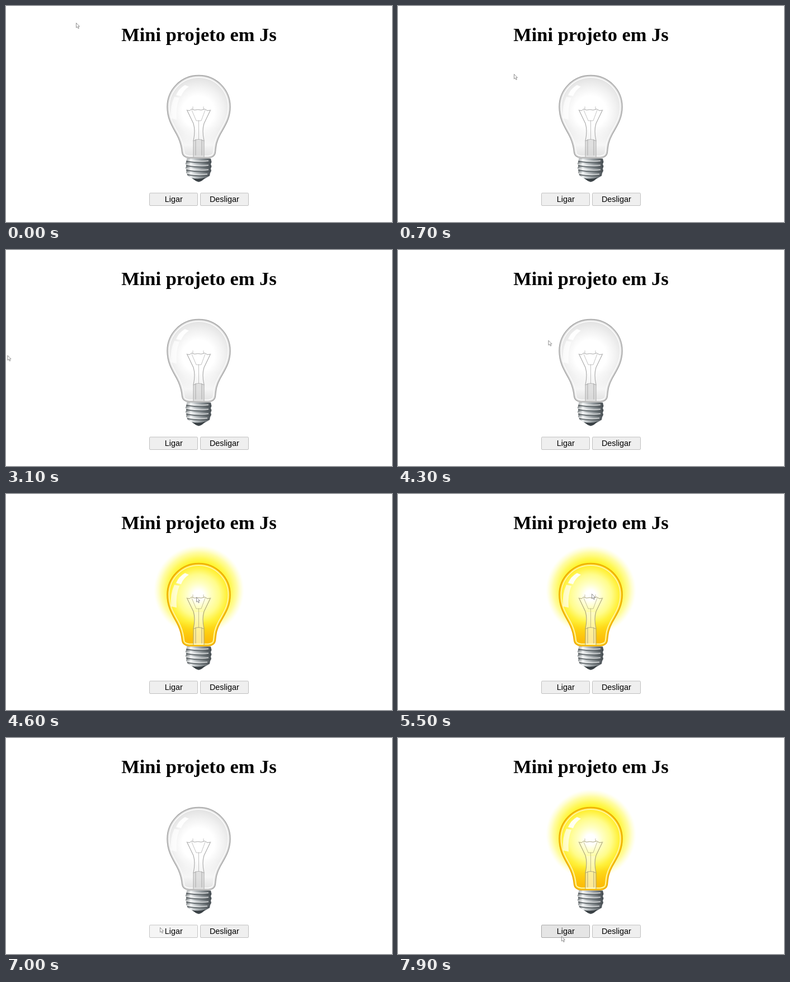
An HTML page that plays this animation: 690x388 px, repeating every 8 s.

```html
<!DOCTYPE html>
<html lang="pt">
<head>
<meta charset="utf-8">
<title>Mini projeto em Js</title>
<style>
  html, body { margin: 0; width: 100%; height: 100%; overflow: hidden; background: #fff; }
  svg { display: block; width: 690px; height: 388px; }
  text { text-anchor: middle; }
  .title { font: bold 34.4px "Liberation Serif", "Times New Roman", serif; }
  .label { font: 14.4px "Liberation Sans", Arial, sans-serif; }
  .button { fill: #efefef; stroke: #c0c0c0; }

  .lit, .unlit, .press { animation: 8s step-end infinite; }
  .lit { animation-name: lit; }
  .unlit { animation-name: unlit; }
  .press { animation-name: press; }
  #cursor { animation: move 8s linear infinite; }

  @keyframes lit {
    0%, 75% { visibility: hidden; }
    55%, 90%, 100% { visibility: visible; }
  }
  @keyframes unlit {
    0%, 75% { visibility: visible; }
    55%, 90%, 100% { visibility: hidden; }
  }
  @keyframes press {
    0% { fill: #efefef; stroke: #c0c0c0; }
    82.5%, 90%, 100% { fill: #e5e5e5; stroke: #a6a6a6; }
    87.5% { fill: #f5f5f5; stroke: #c4c4c4; }
  }
  /* The pointer is sampled every 100 ms, which is 1.25% of the loop. */
  @keyframes move {
    0% { transform: translate(125px, 30px); }
    2.5% { transform: translate(125px, 30px); animation-timing-function: steps(3, start); }
    6.25% { transform: translate(185px, 88px); animation-timing-function: steps(3, start); }
    10% { transform: translate(207px, 122px); }
    15% { transform: translate(207px, 122px); animation-timing-function: steps(5, start); }
    21.25% { transform: translate(247px, 143px); }
    28.75% { transform: translate(247px, 143px); animation-timing-function: steps(1, start); }
    30% { transform: translate(0, 253px); }
    35% { transform: translate(0, 253px); animation-timing-function: steps(5, start); }
    41.25% { transform: translate(3px, 173px); animation-timing-function: steps(4, start); }
    46.25% { transform: translate(60px, 211px); animation-timing-function: steps(1, start); }
    47.5% { transform: translate(178px, 165px); }
    50% { transform: translate(178px, 165px); animation-timing-function: steps(4, start); }
    55% { transform: translate(268.5px, 162px); animation-timing-function: steps(3, start); }
    58.75% { transform: translate(340px, 185px); }
    60% { transform: translate(340px, 185px); animation-timing-function: steps(3, start); }
    63.75% { transform: translate(396px, 154px); animation-timing-function: steps(2, start); }
    66.25% { transform: translate(372px, 236px); animation-timing-function: steps(3, start); }
    70% { transform: translate(346px, 179px); animation-timing-function: steps(1, start); }
    71.25% { transform: translate(326px, 198px); }
    73.75% { transform: translate(326px, 198px); animation-timing-function: steps(3, start); }
    77.5% { transform: translate(248px, 328px); animation-timing-function: steps(3, start); }
    81.25% { transform: translate(231px, 332px); animation-timing-function: steps(3, start); }
    85% { transform: translate(273px, 339px); animation-timing-function: steps(1, start); }
    86.25% { transform: translate(275px, 340px); }
    98.75% { transform: translate(275px, 340px); animation-timing-function: steps(1, start); }
    100% { transform: translate(292px, 356px); }
  }
</style>
</head>
<body>
<svg viewBox="0 0 690 388">
  <defs>
    <path id="glass" d="M344.500 124.500C376 124.500 401 150 401 181C401 203 391 216 383 231C376 244 375.500 252 374.500 262C374 269 370 272 362 273H327C319 272 315 269 314.500 262C313.500 252 312 244 305 231C297 216 288 203 288 181C288 150 313 124.500 344.500 124.500Z"/>
    <clipPath id="inside"><use href="#glass"/></clipPath>
    <filter id="soft" x="-20%" y="-20%" width="140%" height="140%"><feGaussianBlur stdDeviation=".7"/></filter>

    <radialGradient id="clear" gradientUnits="userSpaceOnUse" cx="344" cy="190" r="68">
      <stop offset=".42" stop-color="#fff"/>
      <stop offset=".66" stop-color="#f2f2f2"/>
      <stop offset="1" stop-color="#dcdcdc"/>
    </radialGradient>
    <linearGradient id="clearNeck" x2="0" y2="1">
      <stop offset=".65" stop-color="#fff" stop-opacity="0"/>
      <stop offset=".84" stop-color="#fff" stop-opacity=".7"/>
      <stop offset="1" stop-color="#e2e2e2" stop-opacity=".7"/>
    </linearGradient>
    <radialGradient id="warm" gradientUnits="userSpaceOnUse" cx="344" cy="182" r="90">
      <stop offset=".1" stop-color="#fff"/>
      <stop offset=".24" stop-color="#ffffc4"/>
      <stop offset=".42" stop-color="#fffc8a"/>
      <stop offset=".56" stop-color="#fff13c"/>
      <stop offset=".7" stop-color="#fee01c"/>
      <stop offset="1" stop-color="#fcc410"/>
    </radialGradient>
    <linearGradient id="warmNeck" x2="0" y2="1">
      <stop offset=".7" stop-color="#fdb400" stop-opacity="0"/>
      <stop offset="1" stop-color="#fdb400" stop-opacity=".7"/>
    </linearGradient>
    <radialGradient id="glow" gradientUnits="userSpaceOnUse" cx="345" cy="173" r="81">
      <stop offset=".62" stop-color="#fff42a"/>
      <stop offset=".72" stop-color="#fff742" stop-opacity=".85"/>
      <stop offset=".84" stop-color="#fffa5c" stop-opacity=".55"/>
      <stop offset=".94" stop-color="#fffc90" stop-opacity=".22"/>
      <stop offset="1" stop-color="#fffec0" stop-opacity="0"/>
    </radialGradient>
    <linearGradient id="metal">
      <stop offset="0" stop-color="#6b7174"/>
      <stop offset=".2" stop-color="#eceff0"/>
      <stop offset=".42" stop-color="#b4babd"/>
      <stop offset=".72" stop-color="#7b8286"/>
      <stop offset="1" stop-color="#444b50"/>
    </linearGradient>

    <g id="shine" fill="#fff">
      <path d="M304 160Q309 148 320 142L327 145Q317 151 313 162Z" opacity=".9"/>
      <path d="M295 202Q293 180 301 163L310 165Q303 181 305 204Z" opacity=".65"/>
    </g>
    <g id="wires" fill="none" stroke-linecap="round" stroke-linejoin="round">
      <path d="M323 187L328 188 332 185 337 187 343 186 349 187 355 185 360 188 366 187" stroke-width="1"/>
      <path d="M324 188L335 211Q339 224 335 242M365 188L354 211Q350 224 354 242" stroke-width="1.1"/>
      <path d="M332 187L340 206H349L356 187M344.500 206V240M334 181V186M353 181V186" stroke-width=".7"/>
      <path d="M335 242V271M354 242V271M339 240V268M350 240V268M336 242Q344 237 353 242" stroke-width="1"/>
    </g>
  </defs>

  <text class="title" x="345" y="63">Mini projeto em Js</text>

  <g class="unlit">
    <use href="#glass" fill="url(#clear)"/>
    <use href="#glass" fill="url(#clearNeck)"/>
    <g clip-path="url(#inside)" fill="none">
      <use href="#glass" stroke="#fafafa" stroke-width="9" filter="url(#soft)"/>
      <use href="#glass" stroke="#d2d2d2" stroke-width="5" filter="url(#soft)"/>
    </g>
    <use href="#glass" fill="none" stroke="#a6a6a6" stroke-width="1.4"/>
    <use href="#shine"/>
    <path d="M335 241H354V271H335Z" fill="#d2d2d2" opacity=".6"/>
    <use href="#wires" stroke="#a9a9a9"/>
  </g>

  <g class="lit">
    <circle cx="345" cy="173" r="81" fill="url(#glow)"/>
    <use href="#glass" fill="url(#warm)"/>
    <use href="#glass" fill="url(#warmNeck)"/>
    <g clip-path="url(#inside)" fill="none">
      <use href="#glass" stroke="#fff7a0" stroke-width="9" filter="url(#soft)"/>
      <use href="#glass" stroke="#fbc814" stroke-width="5" filter="url(#soft)"/>
    </g>
    <use href="#glass" fill="none" stroke="#eaa600" stroke-width="1.5"/>
    <use href="#shine"/>
    <path d="M337 212H352L354 271H335Z" fill="#fffbd0" opacity=".7"/>
    <use href="#wires" stroke="#aaa47c"/>
  </g>

  <g>
    <path d="M323 274H366L367.500 280 366 284 367.500 288 366 292 367 296 365 300 364 305 354 311 344.500 316.500 335 311 325 305 322 299 323 295 321 291 322.500 287 321 283 322.500 279Z" fill="url(#metal)"/>
    <path d="M322 279Q344 283 367 281M322 287Q344 291 367 289M322 295Q344 299 366 297M324 303Q344 307 364 304" fill="none" stroke="#4a5155" stroke-width="1.8" opacity=".75"/>
    <path d="M322 276Q344 280 362 278M322 284Q344 288 362 286M322 292Q344 296 362 294M323 300Q344 304 360 302" fill="none" stroke="#fff" stroke-width="1.8" opacity=".6"/>
    <path d="M332 309Q344 312 357 308L350 314Q344.500 317.500 339 314Z" fill="#3a4145"/>
  </g>

  <rect class="button press" x="256.5" y="336" width="86" height="22.5" rx="1.5"/>
  <rect class="button" x="347.5" y="336" width="86" height="22.5" rx="1.5"/>
  <text class="label" x="299.7" y="352">Ligar</text>
  <text class="label" x="390.3" y="352">Desligar</text>

  <path id="cursor" d="M.5.5V9L2.500 7.200 4 10.500 5.400 9.900 4 6.700H6.500Z" fill="#fff" stroke="#777" stroke-width=".8" stroke-linejoin="round"/>
</svg>
</body>
</html>
```
